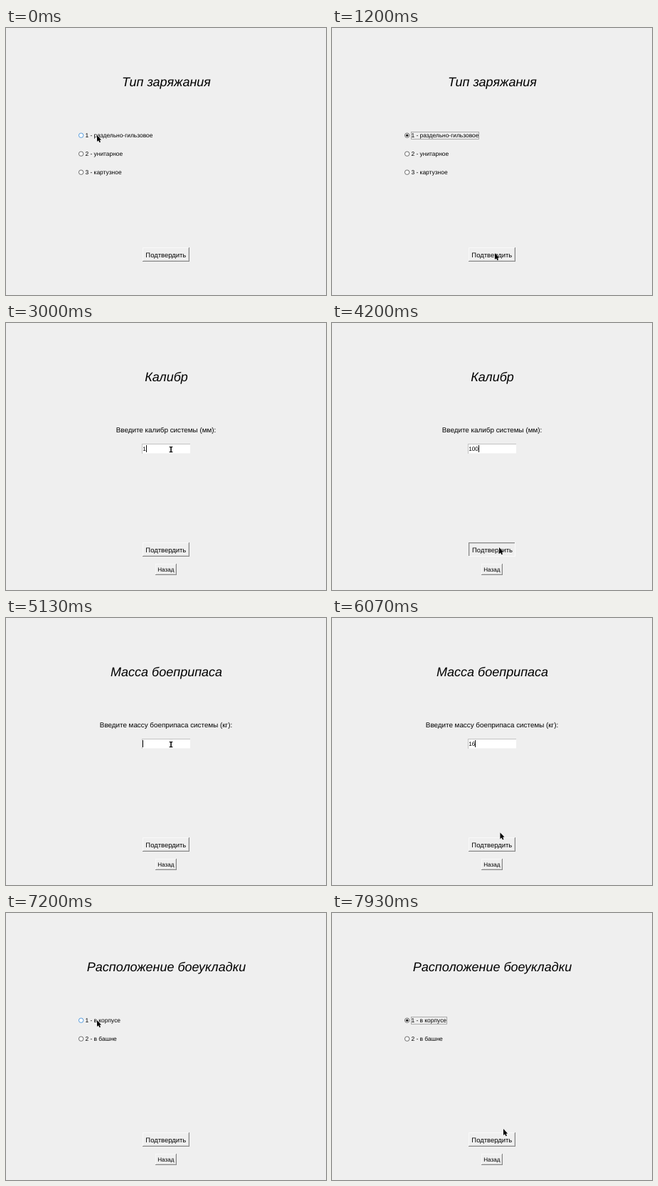
An HTML page with a canvas for the animation above (8000 ms loop, 450 by 376 pixels).

```html
<!DOCTYPE html>
<html lang="ru">
<head>
<meta charset="utf-8">
<style>
html, body { margin: 0; width: 450px; height: 376px; overflow: hidden; background: #efefef; }
canvas { display: block; }
</style>
</head>
<body>
<canvas id="stage" width="450" height="376"></canvas>
<script>
const ctx = document.getElementById('stage').getContext('2d');
const FONT = '"Liberation Sans", Arial, sans-serif';
const FACE = '#efefef';
const LOOP = 8000, STEP = 1000 / 15;
const GLIDE = 500, PRESS = 65, CLICK = 130, KEY = 133;
const FIRST_ROW = 151, ROW_GAP = 26;
const OPTION = { x: 128, y: 151 }, FIELD = { x: 232, y: 178 };

// reach: the pointer sets off for the input; leave: it sets off for the exit point
const pages = [
  { title: 'Тип заряжания', reach: -GLIDE, leave: 560, press: 1470, exit: { x: 229, y: 317 },
    options: ['1 - раздельно-гильзовое', '2 - унитарное', '3 - картузное'], click: 130 },
  { title: 'Калибр', reach: 1580, leave: 3660, press: 4190, exit: { x: 235, y: 316 },
    prompt: 'Введите калибр системы (мм):', value: '100', firstKey: 2725, nextKey: 3460 },
  { title: 'Масса боеприпаса', reach: 4230, leave: 5730, press: 6260, exit: { x: 237, y: 317 },
    prompt: 'Введите массу боеприпаса системы (кг):', value: '16', firstKey: 5195, nextKey: 5325 },
  { title: 'Расположение боеукладки', reach: 6500, leave: 7430, press: LOOP, exit: { x: 241, y: 304 },
    options: ['1 - в корпусе', '2 - в башне'], click: 7260 }
];

const mix = (a, b, k) => ({ x: a.x + (b.x - a.x) * k, y: a.y + (b.y - a.y) * k });

function glide(t, start) {
  const u = Math.min(1, Math.max(0, (t - start) / GLIDE));
  return 1 - (1 - u) ** 2;
}

function pointerAt(index, t) {
  const page = pages[index];
  const input = page.options ? OPTION : FIELD;
  const entered = index ? pages[index - 1].exit : input;
  return mix(mix(entered, input, glide(t, page.reach)), page.exit, glide(t, page.leave));
}

function text(str, x, y, size, align = 'left', style = '') {
  ctx.save();
  // A hair of shear keeps small glyphs unhinted.
  ctx.transform(1, 1e-4, 0, 1, x, y);
  ctx.textRendering = 'geometricPrecision';
  ctx.font = `${style} ${size}px ${FONT}`;
  ctx.textAlign = align;
  ctx.fillStyle = '#000';
  ctx.fillText(str, 0, 0);
  const { width } = ctx.measureText(str);
  ctx.restore();
  return width;
}

function rect(color, x, y, w, h) {
  ctx.fillStyle = color;
  ctx.fillRect(x, y, w, h);
}

function button(label, x, y, w, h, size, pressed) {
  const shift = pressed ? 0.7 : 0;
  rect(pressed ? '#fafafa' : '#868686', x, y, w, h);
  rect(pressed ? '#868686' : '#f8f8f8', x, y, w - 1, h - 1);
  rect(pressed ? '#d4d4d4' : FACE, x + 1, y + 1, w - 2, h - 2);
  if (pressed) rect(FACE, x + 2, y + 2, w - 3, h - 3);
  else {
    rect('#d4d4d4', x + w - 2, y + 1, 1, h - 2);
    rect('#d4d4d4', x + 1, y + h - 2, w - 2, 1);
  }
  text(label, x + w / 2 - 0.2 + shift, y + h / 2 + size * 0.37 + 0.3 + shift, size, 'center');
}

function disc(x, y, r, fill, stroke) {
  ctx.beginPath();
  ctx.arc(x, y, r, 0, 2 * Math.PI);
  ctx.fillStyle = fill;
  ctx.fill();
  if (!stroke) return;
  ctx.lineWidth = 0.8;
  ctx.strokeStyle = stroke;
  ctx.stroke();
}

function radio(label, y, hover, sinceClick) {
  const focused = sinceClick >= 0, checked = sinceClick >= CLICK;
  disc(105.6, y + 0.2, 3.2, focused && !checked ? '#cce4f7' : '#fff', hover ? '#2f86d6' : '#484848');
  if (checked) disc(105.6, y + 0.2, 1.75, '#222');
  const width = text(label, 111.4, y + 2.9, 8.42);
  if (!focused) return;
  ctx.lineWidth = 0.8;
  ctx.strokeStyle = '#999';
  ctx.strokeRect(111.5, y - 4.5, Math.round(width), 10);
}

function options(page, t, pointer) {
  page.options.forEach((label, i) => {
    const y = FIRST_ROW + ROW_GAP * i;
    const hover = pointer.x < 112 + label.length * 4.2 && Math.abs(pointer.y - y) < 7;
    radio(label, y, hover, i ? -1 : t - page.click);
  });
}

function typed({ value, firstKey, nextKey }, t) {
  const later = Math.max(0, Math.floor((t - nextKey) / KEY) + 1);
  return value.slice(0, t < firstKey ? 0 : 1 + later);
}

function entry(page, t) {
  text(page.prompt, 225, 154.2, 9.85, 'center');
  rect('#c2c2c2', 191, 170, 68, 14);
  rect('#f6f6f6', 192, 171, 67, 13);
  rect('#fff', 192, 171, 67, 12);
  const width = text(typed(page, t), 192.2, 179.6, 8.2);
  const focusAge = t - page.reach - GLIDE;
  if (focusAge >= 0 && focusAge % 900 < 600) rect('#111', 192 + Math.round(width), 172, 1, 10);
}

function arrow({ x, y }) {
  ctx.beginPath();
  [[0, 0], [0, 9], [2, 7.2], [3.5, 10.2], [5, 9.5], [3.6, 6.7], [6, 6.4]]
    .forEach(([dx, dy]) => ctx.lineTo(x + dx, y + dy));
  ctx.closePath();
  ctx.lineWidth = 0.8;
  ctx.strokeStyle = '#f4f4f4';
  ctx.stroke();
  ctx.fillStyle = '#000';
  ctx.fill();
}

function beam({ x, y }) {
  rect('#000', x - 0.7, y - 4, 1.5, 8);
  for (const end of [-4, 3]) rect('#000', x - 2.3, y + end, 4.6, 1.2);
}

function draw(t) {
  const index = pages.findIndex(p => t < p.press + PRESS);
  const page = pages[index];
  const pointer = pointerAt(index, t);
  const { x, y } = pointer;

  rect(FACE, 0, 0, 450, 376);
  text(page.title, 225.5, 81.8, 18, 'center', 'italic');
  if (page.options) options(page, t, pointer);
  else entry(page, t);

  button('Подтвердить', 192, 309, 66, 20, 9.45, t >= page.press);
  if (index) button('Назад', 210, 339, 30, 16, 8.1, false);

  const overField = page.prompt && x > 191 && x < 259 && y > 170 && y < 184;
  (overField ? beam : arrow)(pointer);
}

function tick() {
  const t = performance.now() % LOOP;
  draw(Math.floor(t / STEP + 0.1) * STEP % LOOP);
  requestAnimationFrame(tick);
}
tick();
</script>
</body>
</html>
```
